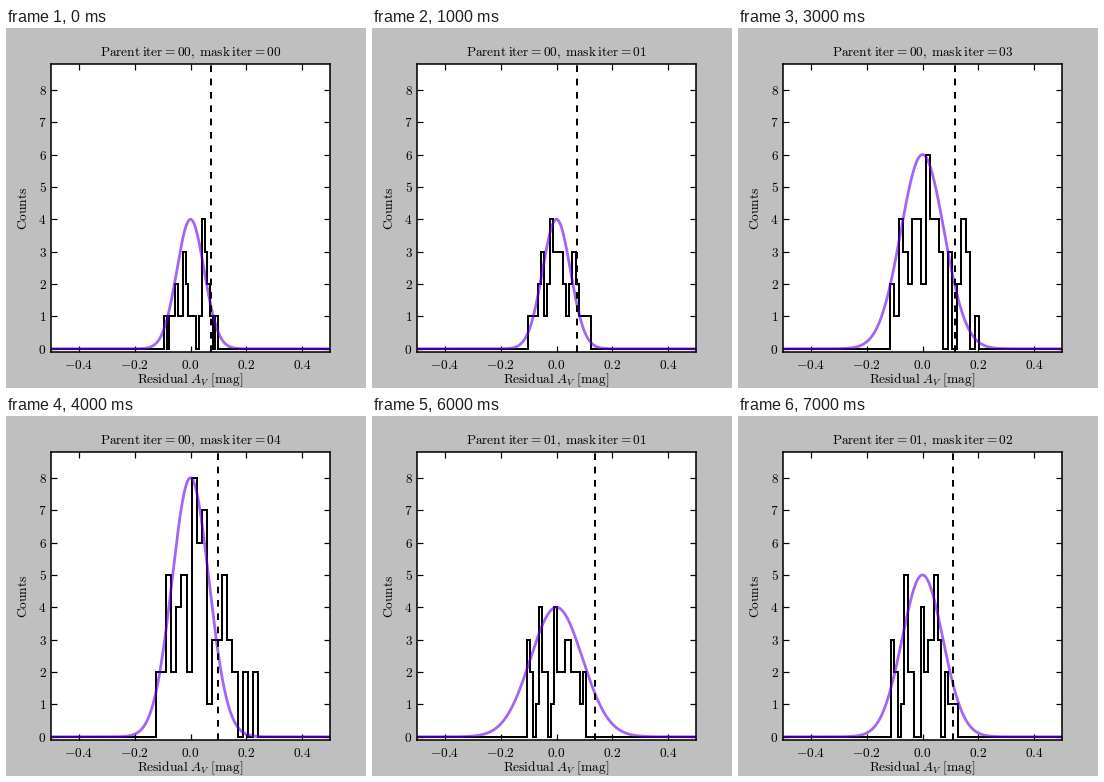
Recreate the animation shown at these times as a matplotlib script. Size 360 by 360 pixels, loop 8 s.

```python
import numpy as np
import matplotlib.pyplot as plt
from matplotlib.animation import FuncAnimation

plt.rcParams.update({"mathtext.fontset": "cm", "font.size": 12})

SIZE, DPI = 360, 80
GREY = "0.75"
VIOLET = "#6600ee"


def blend(a, b):
    """Intermediate histogram between two neighbouring iterations."""
    return np.rint(0.6 * (np.array(a) + np.array(b))).astype(int)


first_start = [1, 0, 1, 1, 2, 1, 1, 3, 2, 1, 1, 1, 0, 1, 4, 3, 2, 1, 0, 1]
first_grown = [1, 2, 1, 3, 3, 0, 3, 3, 3, 4, 4, 3, 2, 3, 1, 1, 0, 0, 2, 1]
first_wide = [2, 1, 4, 3, 2, 4, 4, 2, 6, 4, 4, 3, 0, 3, 0, 2, 4, 3, 0, 1]
first_full = [2, 2, 5, 2, 4, 5, 2, 8, 6, 7, 1, 3, 3, 5, 3, 2, 0, 2, 0, 2]
second_start = [2, 1, 0, 0, 1, 2, 2, 0, 1, 2, 2, 0, 1, 0, 2, 3, 1, 3, 1, 3]
second_grown = [3, 2, 0, 1, 5, 2, 2, 0, 0, 4, 2, 3, 3, 5, 3, 0, 2, 1, 1, 1]

# parent, mask, lowest edge, highest edge, sigma, counts
STEPS = [
    (0, 0, -0.095, 0.099, 0.0490, first_start),
    (0, 1, -0.102, 0.125, 0.0500, blend(first_start, first_grown)),
    (0, 2, -0.109, 0.163, 0.0660, first_grown),
    (0, 3, -0.117, 0.203, 0.0775, first_wide),
    (0, 4, -0.124, 0.242, 0.0660, first_full),
    (1, 0, -0.095, 0.084, 0.0680, second_start),
    (1, 1, -0.105, 0.106, 0.0930, blend(second_start, second_grown)),
    (1, 2, -0.113, 0.127, 0.0730, second_grown),
]

fig = plt.figure(figsize=(SIZE / DPI, SIZE / DPI), dpi=DPI, facecolor=GREY)
ax = fig.add_axes([0.125, 0.1, 0.775, 0.8])
ax.set_xlim(-0.5, 0.5)
ax.set_ylim(-0.1, 8.8)
for spine in ax.spines.values():
    spine.set_linewidth(1.4)

xticks = [-0.4, -0.2, 0, 0.2, 0.4]
ax.set_xticks(xticks, [f"${x:.1f}$" for x in xticks])
ax.set_yticks(range(9), [f"${y}$" for y in range(9)])
ax.tick_params(direction="in", top=True, right=True, length=5, width=1.1)
ax.tick_params(axis="x", pad=6)
ax.tick_params(axis="y", pad=4)

fig.text(184.5 / SIZE, 1 - 355 / SIZE,
         r"$\mathrm{Residual}\ A_V\ \mathrm{[mag]}$",
         ha="center", va="baseline")
fig.text(24 / SIZE, 0.5, r"$\mathrm{Counts}$", rotation=90,
         ha="right", va="center")
title = fig.text(184.5 / SIZE, 1 - 28 / SIZE, "",
                 ha="center", va="baseline")

xs = np.linspace(-0.5, 0.5, 500)
bars, = ax.plot([], [], color="black", lw=1.8, drawstyle="steps-post",
                solid_joinstyle="miter", zorder=2)
limit = ax.axvline(0, color="black", lw=1.8, zorder=2.2)
limit.set_linestyle((0, (6 / 1.8, 6 / 1.8)))
limit.set_dash_capstyle("butt")
curve, = ax.plot([], [], color=VIOLET, alpha=0.6, lw=2.5, zorder=2.1)


def draw(i):
    parent, mask, low, high, sigma, counts = STEPS[i]
    edges = np.linspace(low, high, len(counts) + 1)
    bars.set_data([-0.5, *edges, 0.5], [0, *counts, 0, 0])
    curve.set_data(xs, max(counts) * np.exp(-0.5 * (xs / sigma) ** 2))
    limit.set_xdata([1.5 * sigma] * 2)
    title.set_text(rf"$\mathrm{{Parent\:iter}}=\mathrm{{{parent:02d},}}\:"
                   rf"\mathrm{{mask\:iter}}=\mathrm{{{mask:02d}}}$")
    return bars, curve, limit, title


anim = FuncAnimation(fig, draw, frames=len(STEPS), interval=1000,
                     repeat=True, repeat_delay=0)
plt.show()
```
